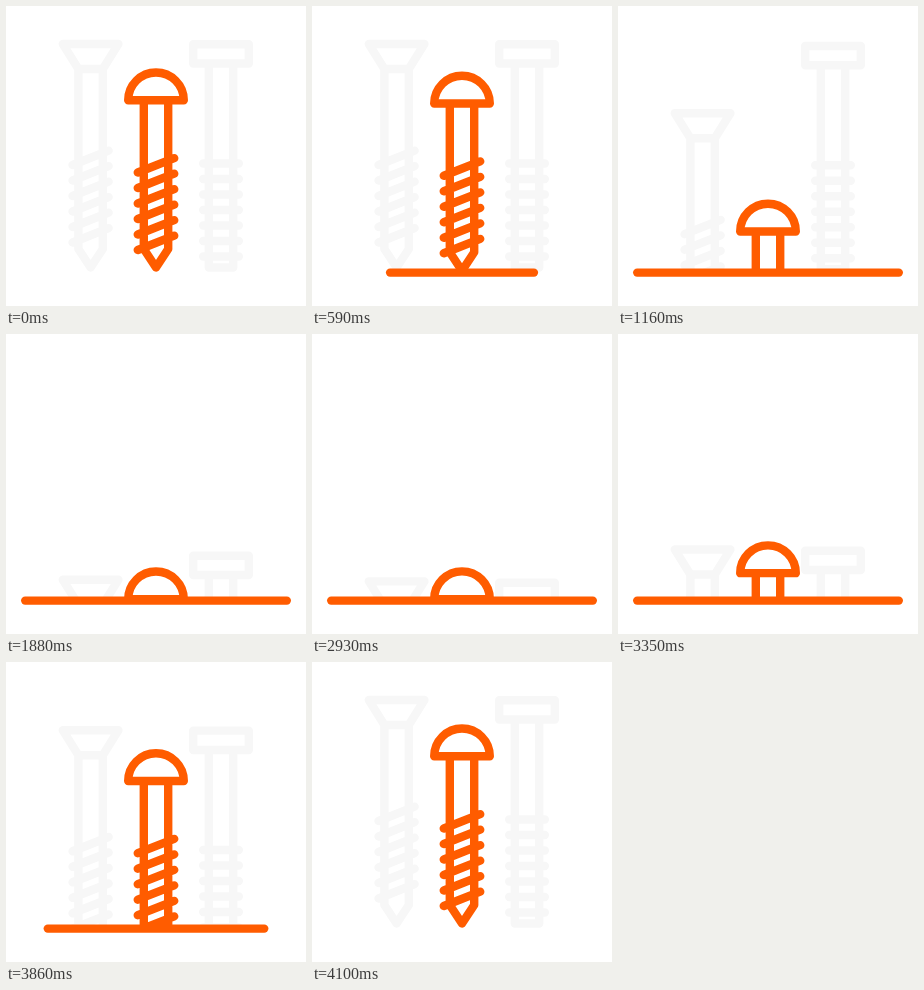
Animation of 300 by 300 pixels, one loop 4160 ms. Source, as an HTML page:

```html
<!DOCTYPE html>
<html lang="en">
<head>
<meta charset="utf-8">
<title>Screws</title>
<style>
  html, body { margin: 0; width: 100%; height: 100%; overflow: hidden; background: #fff; }
  svg { display: block; width: 100%; height: 100%; }
  path { fill: none; stroke-width: 8.4; stroke-linecap: round; stroke-linejoin: round; }
  .pale { stroke: #f7f7f7; }
  .bright { stroke: #ff5c00; }
</style>
</head>
<body>
<svg viewBox="0 0 300 300">
  <clipPath id="above"><rect width="300" height="266.6"/></clipPath>
  <g clip-path="url(#above)">
    <path id="flat" class="pale"/>
    <path id="bolt" class="pale"/>
    <path id="dome" class="bright"/>
  </g>
  <path id="ground" class="bright"/>
</svg>
<script>
const LOOP = 4160, TURN = 2600, RISE_END = 4100;
const DRIVE = 1200, GROW = 600, FIRST = 500;
const PITCH = 15.5;
const find = id => document.getElementById(id);

// Cubic Bézier easing with control points (x1, 0) and (x2, 1).
function ease(x, x1, x2) {
  if (x <= 0) return 0;
  if (x >= 1) return 1;
  let low = 0, high = 1;
  for (let i = 0; i < 30; i++) {
    const s = (low + high) / 2, r = 1 - s;
    if (3 * r * r * s * x1 + 3 * r * s * s * x2 + s ** 3 < x) low = s;
    else high = s;
  }
  return low * low * (3 - 2 * low);
}

// Goes in from its own start; everything comes out together, mirrored in time.
function progress(t, start, duration, x1, x2) {
  const elapsed = t < TURN ? t - start : RISE_END - t;
  return ease(elapsed / duration, x1, x2);
}

function threads(cx, half, leftY, rightY, count) {
  return Array.from({ length: count }, (_, i) =>
    `M${cx - half} ${leftY + i * PITCH}L${cx + half} ${rightY + i * PITCH}`).join('');
}

const shaft = (cx, top, bottom, tip) =>
  `M${cx - 12.2} ${top}V${bottom}${tip ? `L${cx} ${tip}` : ''}L${cx + 12.2} ${bottom}V${top}`;

find('flat').setAttribute('d',
  'M56.8 38H112.4L96.8 63H72.4Z' + shaft(84.6, 63, 243, 261.5) + threads(84.6, 18, 159, 144.7, 6));
find('bolt').setAttribute('d',
  'M187.2 38.2H242.8V57.5H187.2Z' + shaft(215, 57.5, 261.5) + threads(215, 17.8, 157.5, 157.5, 7));
find('dome').setAttribute('d',
  'M122.2 94.3a27.8 27.8 0 0 1 55.6 0Z' + shaft(150, 94.3, 243, 261.5) + threads(150, 18.2, 166.5, 152.2, 6));

const screws = [
  { node: find('dome'), start: FIRST, depth: 171 },
  { node: find('flat'), start: FIRST + 300, depth: 209.5 },
  { node: find('bolt'), start: FIRST + 600, depth: 210.7 }
];
const ground = find('ground');

function draw(t) {
  for (const { node, start, depth } of screws) {
    const y = depth * progress(t, start, DRIVE, 0.333, 0.36);
    node.setAttribute('transform', `translate(0 ${y})`);
  }
  const half = 130.8 * progress(t, FIRST, GROW, 0, 0);
  ground.setAttribute('d', half > 0 ? `M${150 - half} 266.6H${150 + half}` : '');
}

function tick() {
  draw(performance.now() % LOOP);
  requestAnimationFrame(tick);
}
tick();
</script>
</body>
</html>
```
